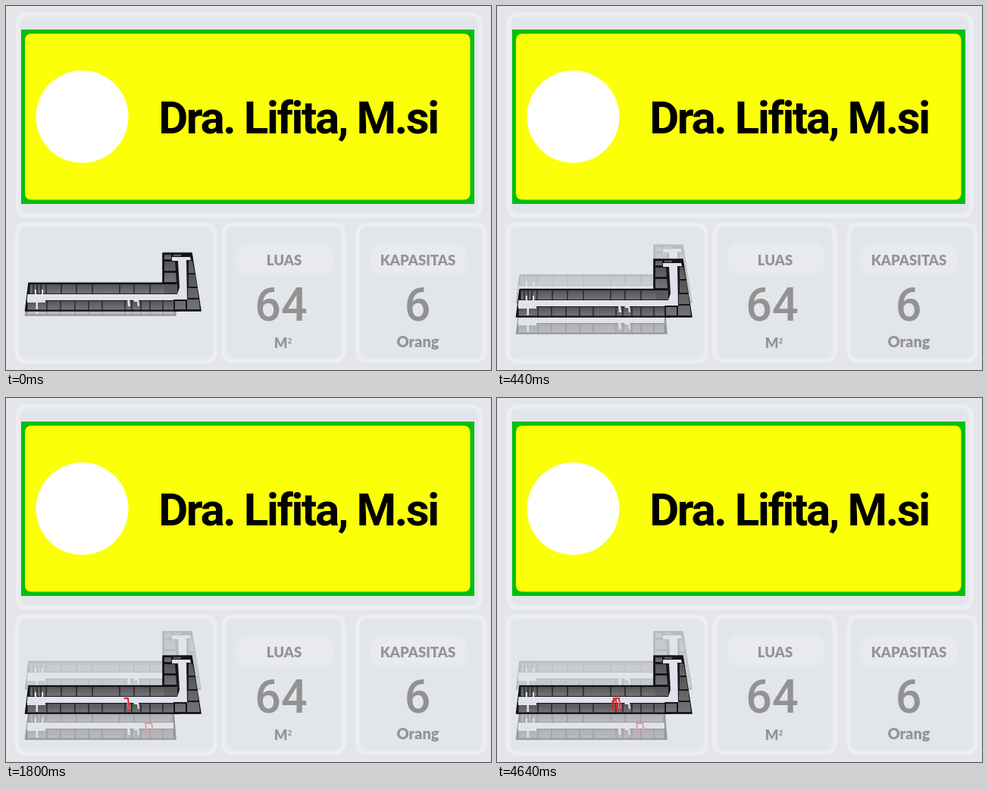
Recreate the animation shown at these times as an HTML page. Size 640x480 px, loop 5.12 s.

```html
<!DOCTYPE html>
<html lang="id">
<head>
<meta charset="utf-8">
<title>Ruangan</title>
<style>
html, body { margin: 0; width: 100%; height: 100%; overflow: hidden; background: #e4e6eb; }
svg { display: block; width: 640px; height: 480px; }
text { text-anchor: middle; }
.name { font: 600 60px Roboto, sans-serif; letter-spacing: -2.4px; }
.value { font: 500 61px Roboto, sans-serif; fill: #929292; }
.label { font: 900 18.5px Lato, sans-serif; fill: #959595; }
.card { fill: #e2e5ea; stroke: #eceef1; stroke-width: 6; }
.edge { fill: none; stroke: #dde0e5; }
.pill { fill: #e8eaee; }
.wall { fill: #17171a; stroke: #0c0d12; stroke-width: 1.5; stroke-linejoin: round; }
.room { fill: url(#roof); }
.hall { fill: #e0e2ec; }
.route { fill: none; stroke: #e5232f; stroke-width: 2; }
</style>
</head>
<body>
<svg viewBox="0 0 640 480">
  <defs>
    <linearGradient id="roof" x2="0" y2="1">
      <stop stop-color="#555558"/><stop offset="1" stop-color="#747477"/>
    </linearGradient>
    <filter id="soft"><feGaussianBlur stdDeviation="1"/></filter>
  </defs>
  <g id="cards" filter="url(#soft)"></g>
  <path fill="#00bf0c" d="M20 31H618V261H20Z"/>
  <rect x="25" y="36.500" width="587.500" height="219" rx="8" fill="#fbff08"/>
  <circle cx="100.500" cy="146" r="61" fill="#fff"/>
  <text class="name" x="385.500" y="168">Dra. Lifita, M.si</text>
  <g id="lower" opacity=".36"></g>
  <g id="upper" opacity=".2"></g>
  <g id="middle"></g>
  <text class="label" x="367" y="342">LUAS</text>
  <text class="value" x="363" y="415">64</text>
  <text class="label" x="365.500" y="451">M<tspan font-size="10" dy="-6">2</tspan></text>
  <text class="label" x="543.500" y="342">KAPASITAS</text>
  <text class="value" x="543" y="415">6</text>
  <text class="label" x="543.500" y="450" style="font-size:20px">Orang</text>
</svg>
<script>
const LOOP = 5120;
const $ = id => document.getElementById(id);
const ramp = (t, from, to) => Math.min(1, Math.max(0, (t - from) / (to - from)));
const box = (cls, x, y, w, h, rx = 0) =>
  `<rect class="${cls}" x="${x}" y="${y}" width="${w}" height="${h}" rx="${rx}"/>`;
const shape = (cls, d, extra = '') => `<path class="${cls}" d="${d}" ${extra}/>`;

const card = (x, y, w, h) => box('edge', x - 4, y - 4, w + 8, h + 8, 15) + box('card', x, y, w, h, 12);
$('cards').innerHTML = card(15, 11, 611, 266) + card(14, 288, 262, 181)
  + card(287, 288, 159, 180) + card(464, 288, 168, 180)
  + box('pill', 304, 314, 128, 40, 14) + box('pill', 480, 314, 128, 40, 14);

// A row of rooms between the given wall positions.
const row = (walls, y, h) => walls.slice(1).map((x, i) =>
  box('room', walls[i] + .6, y, x - walls[i] - 1.2, h)).join('');

const wing = right =>
  shape('wall', `M30 365.500H${right}L${right + 3} 402H25.500Z`)
  + row([31, 36, 41, 46, 53, 73, 93, 114, 150, 169, 190, right - 1], 367, 12)
  + shape('hall', `M28.500 380H${right}V388H27.500Z`)
  + row([28, 41, 54, 72, 91, 109, 127, 157, 166, 178, 190, 207, right], 389, 11.5)
  + shape('hall', 'M28 388H52V391H42V400H39.500V391H28Z')
  + shape('hall', 'M160 387h3l1 9h-3ZM168 387h7l1 9h-2l-1-6h-4Z')
  + shape('hall', 'M38 374h2v7h-2ZM47 374h2v7h-2Z');

const arm =
  shape('wall', 'M207 366V326H245L257 402H222V366Z')
  + shape('room', 'M209 337H223L225 364H209ZM241 336H246L249 352H241Z')
  + shape('room', 'M241 354H249.500L252 370H241ZM240 372H252.500L254 385H240ZM239 387H254.500L256 400H239Z')
  + shape('room', 'M209 367H226V379H209ZM223 389H237V400H223Z')
  + shape('room', 'M209 328H218V334H209ZM221 327.500H231V330H221Z')
  + shape('hall', 'M219 331H243L244 335H238L239 387H200V380H226L229 371L227 336H219Z')
  + shape('wall', 'M209 350H225V351H209Z');

$('lower').innerHTML = wing(221)
  + shape('route', 'M187 400L184 381H192L196 400', 'id="exit"');
$('upper').innerHTML = wing(225) + arm;
$('middle').innerHTML = wing(225) + arm
  + shape('route', 'M163 399L161 382H154L153 396', 'id="route" pathLength="1" stroke-dasharray="1 2"')
  + shape('route', 'M152.500 386L157 384L158 395L153 396.500Z', 'id="goal"');

const shift = (id, y) => $(id).setAttribute('transform', `translate(0 ${y.toFixed(2)})`);

function draw(now) {
  const t = now % LOOP;
  const spread = ramp(t, 0, 770);
  shift('lower', 6 + 42 * spread);
  shift('upper', -1 - 17 * spread);
  shift('middle', 14 * spread);

  $('exit').style.opacity = ramp(t, 640, 760);
  const drawn = .25 * ramp(t, 1440, 1480) + .75 * ramp(t, 1640, 2000);
  $('route').style.visibility = drawn ? 'visible' : 'hidden';
  $('route').style.strokeDashoffset = 1 - drawn;

  const blinkOff = t >= 3140 && t < 3600 || t >= 4120 && t < 4620;
  $('goal').style.opacity = blinkOff ? 0 : ramp(t, 2420, 2560);
  requestAnimationFrame(draw);
}
requestAnimationFrame(draw);
</script>
</body>
</html>
```
